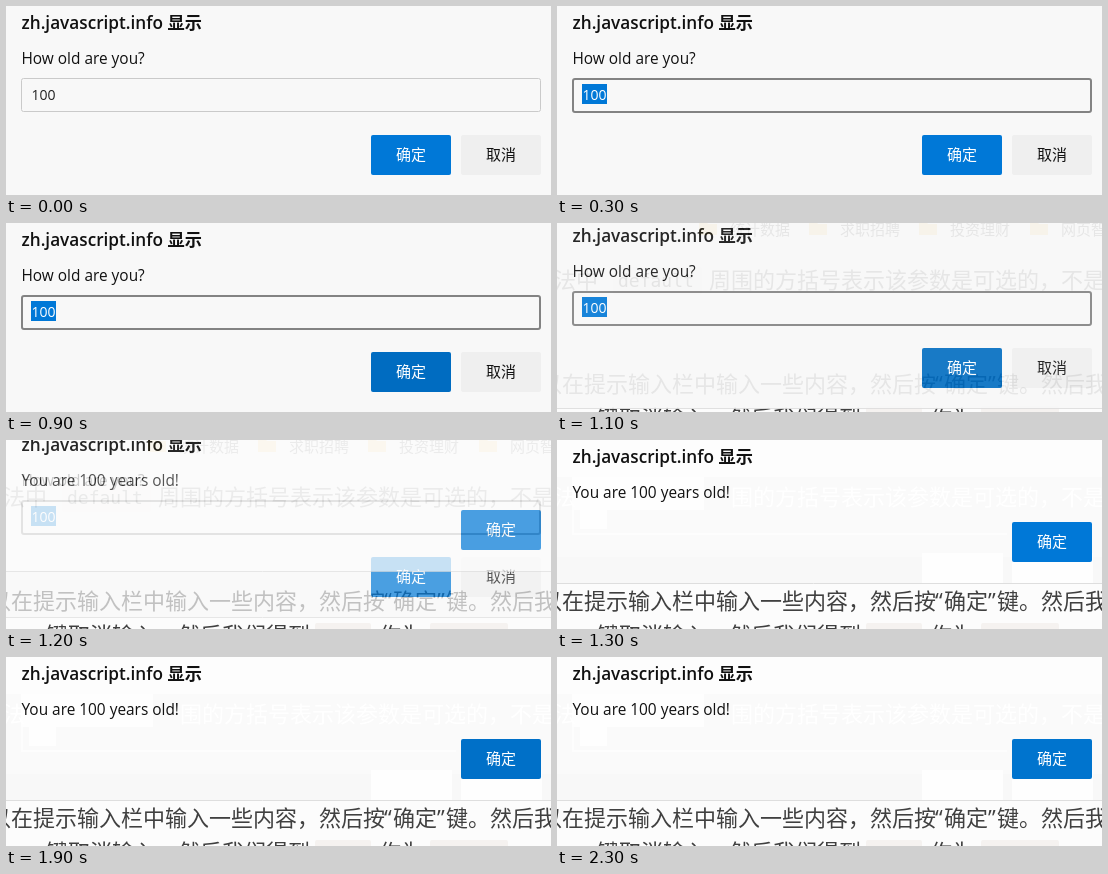
Write an HTML page that moves like this. It is 545 px wide and 189 px high and loops after 2800 ms.

```html
<!DOCTYPE html>
<html lang="zh">
<head>
<meta charset="utf-8">
<title>Prompt and alert</title>
<style>
  html, body { margin: 0; width: 100%; height: 100%; overflow: hidden; background: #fff; }
  svg { display: block; width: 545px; height: 189px; }
  text { font: 15px "Open Sans", "Noto Sans CJK SC", "Noto Sans CJK", sans-serif; fill: #111; white-space: pre; }
  .title { font-size: 17.2px; font-weight: 600; }
  .msg { font-size: 15.4px; }
  .value { font-size: 14px; fill: #222; }
  .label { text-anchor: middle; }
  .primary .label { fill: #fff; }
  .body text, .ghost text { font-size: 22px; fill: #404040; }
  .body .code { font: 18px "DejaVu Sans Mono", monospace; fill: #333; }
  .body .mark { font-size: 15px; fill: #444; }
  .ghost text { fill: #fff; }
</style>
</head>
<body>
<svg viewBox="0 0 545 189">
  <defs>
    <clipPath id="ghostClip"><path d="M0 36H20V72H0zM174 36H545V72H174z"/></clipPath>
  </defs>
  <rect width="545" height="189" fill="#fcfcfc"/>
  <g class="body" id="page"></g>

  <g id="prompt">
    <rect y="-20" width="545" height="209" fill="#f8f8f8"/>
    <path d="M0 189.5H545" stroke="#dedede"/>
    <text class="title" x="15.5" y="23">zh.javascript.info 显示</text>
    <text class="msg" x="15.5" y="57.5">How old are you?</text>
    <rect id="field" fill="#f8f8f8" rx="2"/>
    <rect id="selection" x="25" y="78" width="25" height="20" fill="#0078d7"/>
    <text class="value" id="value" x="25.5" y="93.5">100</text>
    <g class="primary">
      <rect id="promptOk" x="365" y="129" width="80" height="40" rx="2"/>
      <text class="label" x="405" y="153.5">确定</text>
    </g>
    <rect x="455" y="129" width="80" height="40" rx="2" fill="#efefef"/>
    <text class="label" x="495" y="153.5">取消</text>
  </g>

  <g id="alert">
    <rect y="-20" width="545" height="163" fill="#fdfdfd"/>
    <path d="M0 143.5H545" stroke="#dedede"/>
    <g class="ghost" id="residue">
      <rect y="37" width="545" height="106" fill="#fafafa"/>
      <rect y="117" width="545" height="26" fill="#f8f8f8"/>
      <path d="M15 37H147V70H15zM23 64H50V89H23zM365 113H446V143H365zM455 113H536V143H455z" fill="#fefefe"/>
      <path d="M16 70V94H450" fill="none" stroke="#fdfdfd" stroke-width="2"/>
      <g clip-path="url(#ghostClip)">
        <text x="-3" y="65">法</text>
        <text x="152" y="65">周围的方括号表示该参数是可选的，不是</text>
      </g>
    </g>
    <text class="title" x="15.5" y="23">zh.javascript.info 显示</text>
    <text class="msg" x="15.5" y="57.5">You are 100 years old!</text>
    <g class="primary">
      <rect id="alertOk" x="455" y="82" width="80" height="40" rx="2"/>
      <text class="label" x="495" y="106.5">确定</text>
    </g>
  </g>
</svg>
<script>
const LOOP = 2800;
const BLUE = '#0078d7', HOVER = '#006cc1';
const $ = id => document.getElementById(id);
const svgNS = 'http://www.w3.org/2000/svg';

function add(tag, attrs, content = '') {
  const node = document.createElementNS(svgNS, tag);
  set(node, attrs);
  node.textContent = content;
  $('page').append(node);
}
function set(node, attrs) {
  for (const key in attrs) node.setAttribute(key, attrs[key]);
}
const write = (x, y, text, cls = '') => add('text', { x, y, class: cls }, text);
function code(x, y, width, text) {
  add('rect', { x, y: y - 20, width, height: 28, rx: 2, fill: '#f5f2f0' });
  write(x + 5, y, text, 'code');
}

// Page behind the dialogs
[['统计数据', 173], ['求职招聘', 283], ['投资理财', 393], ['网页智能', 504]].forEach(([name, x]) => {
  add('path', { d: `M${x - 31} -2h7l2 3h9v11h-18z`, fill: '#f5cf6b' });
  write(x, 11.5, name, 'mark');
});
write(-3, 65, '法中');
code(56, 64, 89, 'default');
write(152, 65, '周围的方括号表示该参数是可选的，不是');
write(-17, 168.5, '以在提示输入栏中输入一些内容，然后按');
write(378, 168.5, '“');
write(387, 168.5, '确定');
write(431, 168.5, '”');
write(440, 168.5, '键。然后我们');
write(40, 203, '键取消输入，然后我们得到');
code(309, 203, 56, 'null');
write(373, 203, '作为');
code(424, 203, 78, 'result');

// Each step overrides the state before it; y values are dialog offsets.
const start = { focus: false, promptAlpha: 1, promptY: 0, promptOk: BLUE,
                alertAlpha: 0, alertY: -12, alertOk: BLUE, residue: false };
const steps = [
  [0, {}],
  [300, { focus: true }],
  [900, { promptOk: HOVER }],
  [1100, { promptAlpha: 0.9, promptY: -4 }],
  [1200, { promptAlpha: 0.7, promptY: -12, promptOk: BLUE, alertAlpha: 0.7 }],
  [1300, { promptAlpha: 0, alertAlpha: 1, alertY: 0, residue: true }],
  [1900, { alertOk: '#0070c8' }],
  [2300, { alertOk: '#0074ce' }]
];

function place(id, alpha, y) {
  set($(id), { opacity: alpha, transform: `translate(0 ${y})` });
}

function draw(time) {
  const s = Object.assign({}, start, ...steps.filter(([at]) => at <= time).map(step => step[1]));
  place('prompt', s.promptAlpha, s.promptY);
  place('alert', s.alertAlpha, s.alertY);
  set($('promptOk'), { fill: s.promptOk });
  set($('alertOk'), { fill: s.alertOk });
  set($('residue'), { opacity: +s.residue });
  set($('selection'), { opacity: +s.focus });
  $('value').style.fill = s.focus ? '#fff' : '#222';
  set($('field'), s.focus
    ? { x: 16, y: 73, width: 518, height: 33, stroke: '#838383', 'stroke-width': 2 }
    : { x: 15.5, y: 72.5, width: 519, height: 33, stroke: '#cacaca', 'stroke-width': 1 });
}

const origin = performance.now();
function tick() {
  draw((performance.now() - origin) % LOOP);
  requestAnimationFrame(tick);
}
tick();
</script>
</body>
</html>
```
